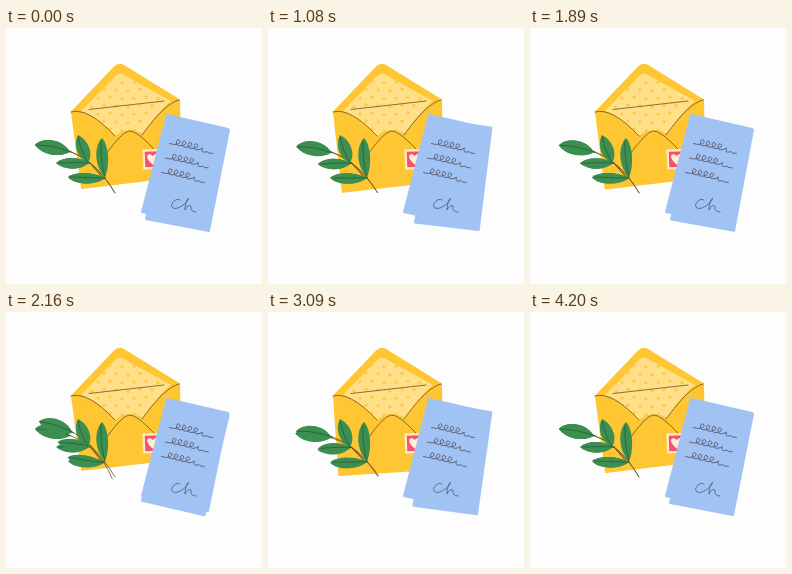
Animation of 256x256 px, one loop 4.23 s. Source, as an HTML page:

```html
<!DOCTYPE html>
<html lang="en">
<head>
<meta charset="utf-8">
<style>
html, body { margin: 0; width: 100%; height: 100%; overflow: hidden; background: #fdfdfd; }
svg { display: block; width: 100vw; height: 100vh; }
.ink { fill: none; stroke: #6b5320; stroke-width: .8; stroke-linecap: round; stroke-linejoin: round; }
.pen { stroke: #55566a; }
.yellow { fill: #fec632; stroke: #fec632; stroke-width: 2; stroke-linejoin: round; }
.sheet { fill: #a0c3f3; stroke: #a0c3f3; stroke-width: 2; stroke-linejoin: round; }
.leaf { fill: #3c8f50; }
.vein { fill: none; stroke: #28553a; stroke-width: .7; stroke-linecap: round; }
.stem { fill: none; stroke: #5a4a22; stroke-width: .7; stroke-linecap: round; }
</style>
</head>
<body>
<svg viewBox="0 0 256 256">
  <defs>
    <g id="spray">
      <path class="stem" d="M61 122Q74 127 84 135Q98 146 109 165M84 135L96 149"/>
      <path class="leaf" d="M29 117C35 110 55 109 64 124C53 130 36 127 29 117Z"/>
      <path class="vein" d="M30 117Q47 117 65 124"/>
      <path class="leaf" d="M50 135C58 128 74 129 83 135C74 143 58 142 50 135Z"/>
      <path class="vein" d="M53 135Q68 134 84 135"/>
      <path class="leaf" d="M62 149C70 143 87 144 99 150C89 158 68 157 62 149Z"/>
      <path class="vein" d="M65 149Q82 150 99 150"/>
    </g>
  </defs>
  <path id="body" class="yellow"/>
  <path class="yellow" d="M66 84L109 39Q113 35 118 38L173 72L137 108L109 109Z"/>
  <path fill="#ffdf87" d="M75 83L109 48Q113 44 118 47L165 73Q153 82 137 106Q122 97 109 108Q91 88 75 83Z"/>
  <g id="dots" fill="#fdca45"></g>
  <path class="ink" d="M83 81.5L158 73M65 84Q82 79 109 108M173 72Q159 75 136 107M100 126Q116 104 123 103Q130 102 148 121"/>
  <g transform="rotate(-2 146 131)">
    <rect x="137" y="121.5" width="19" height="19.5" fill="#fff0d2" stroke="#ffe3ac" stroke-dasharray="1.5 1"/>
    <rect x="139" y="123.5" width="15" height="15.5" fill="#f94f70"/>
    <path fill="#fff0d2" d="M147 137C137 129 142 123 147 128C152 123 156 129 147 137Z"/>
  </g>
  <path id="backSheet" class="sheet" d="M165 89L223 102L203 203L140 191Z"/>
  <path class="sheet" d="M161 87L222 101L202 199L136 184Z"/>
  <g id="writing" class="ink pen"></g>
  <path class="ink pen" d="M174 172C170 169 164 176 166 179C169 183 178 178 182 172C184 168 179 172 179 182Q182 176 185 178Q184 184 190 184"/>
  <use id="under" href="#spray"/>
  <use id="over" href="#spray"/>
  <path class="leaf" d="M72 107C82 112 88 125 82 135C71 130 67 117 72 107Z"/>
  <path class="vein" d="M72 109Q75 123 82 135"/>
  <path class="leaf" d="M96 110C103 117 104 138 99 149C89 140 87 119 96 110Z"/>
  <path class="vein" d="M95 113Q94 132 99 149"/>
</svg>
<script>
const LOOP = 4230;
const ACTIVE = 3810; // everything rests for the remainder of the loop
const $ = id => document.getElementById(id);
const wave = turns => Math.sin(2 * Math.PI * turns);

function drawDots() {
  let out = "";
  for (let row = 0; row < 7; row++) {
    const y = 54 + row * 8;
    const left = Math.max(160 - y, y - 1) - 3 * (y < 82);
    const right = Math.min(122 + (y - 50) * 1.7, 156 - Math.max(0, y - 80) * .8);
    for (let x = 80 + (row % 2) * 6; x < right; x += 12) {
      if (x > Math.min(left, 108)) out += `<circle cx="${x}" cy="${y + wave(x / 37)}" r="1.6"/>`;
    }
  }
  $("dots").innerHTML = out;
}

// A slanted line of handwritten loops ending in a small wave
function scribble(x, y) {
  const loop = "q6 -1 6 -4.5q-3 -3 -3.5 1q0 4 3.5 3.5";
  const d = `M${x} ${y}h4${loop.repeat(4)}q4 -1 5 -3q0 5 3 3.5q3 -2 4 0l4 -.5`;
  return `<path d="${d}" transform="rotate(13 ${x} ${y})"/>`;
}

function drawWriting() {
  let out = "";
  for (let i = 0; i < 3; i++) out += scribble(163.5 - 4 * i, 115.5 + 14.5 * i);
  $("writing").innerHTML = out;
}

const turn = (id, angle, x, y) => $(id).setAttribute("transform", `rotate(${angle} ${x} ${y})`);

function render(t) {
  const u = Math.min(t / ACTIVE, 1);
  const sway = -wave(6 * u);
  const gust = wave(2 * u) * 6.75 * u * u * (1 - u);
  const dip = Math.min(gust, 0);

  turn("backSheet", -4.3 * sway, 192, 95);
  turn("over", 10 * Math.max(gust, -.2), 92, 144);
  turn("under", 7 * dip, 92, 144);

  const x = 76 + 8 * dip, y = 160 + 4 * sway, right = 151 + 3 * sway - 8 * dip;
  $("body").setAttribute("d", `M66 84L${x} ${y}L150 ${right}L174 120L173 72L137 107L109 108Z`);
}

drawDots();
drawWriting();
const start = performance.now();
function tick() {
  render((performance.now() - start) % LOOP);
  requestAnimationFrame(tick);
}
tick();
</script>
</body>
</html>
```
